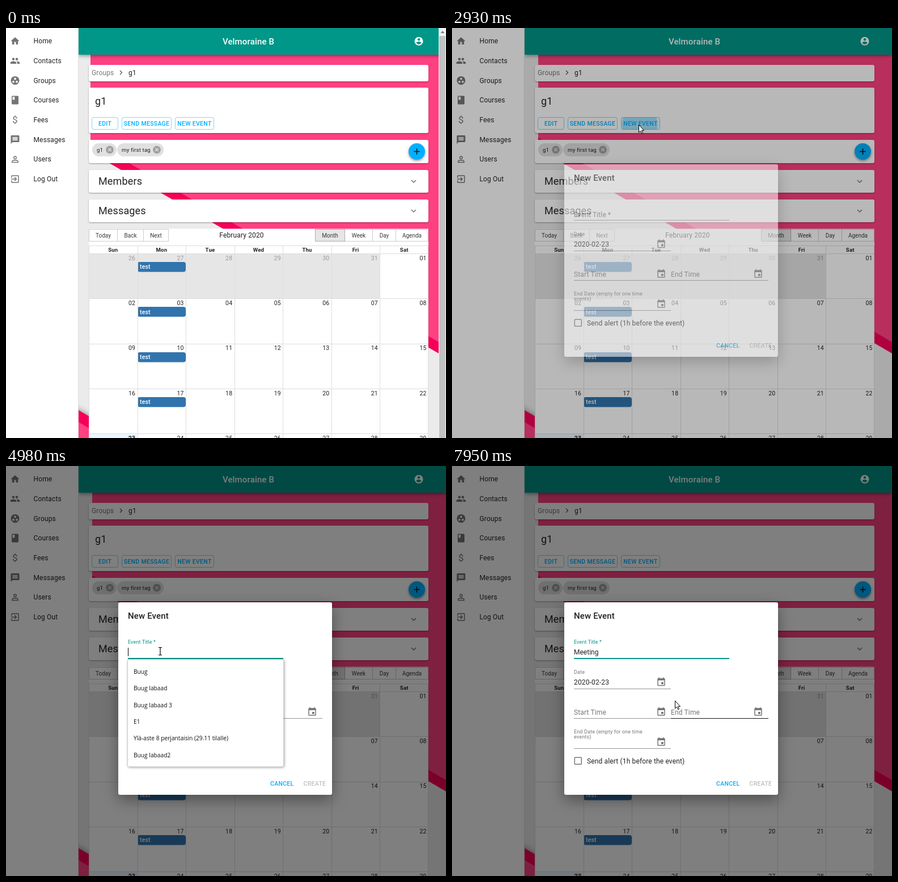
An HTML page that plays this animation: 776 px wide and 722 px high, repeating every 8 s.

```html
<!DOCTYPE html>
<html lang="en">
<head>
<meta charset="utf-8">
<title>New event</title>
<style>
  html, body { margin: 0; width: 100%; height: 100%; overflow: hidden; }
  svg { display: block; font-family: Roboto, sans-serif; letter-spacing: .009em; }
  text { white-space: pre; }
  .card { fill: #fff; filter: drop-shadow(0 1px 1px rgba(0,0,0,.36)); }
  .btn { font-weight: 500; letter-spacing: .028em; }
  .list text { font-family: "Open Sans", sans-serif; letter-spacing: 0; }
</style>
</head>
<body>
<svg id="stage" width="776" height="722" viewBox="0 0 776 722"></svg>
<script>
const LOOP = 8000, TEAL = '#009688', BLUE = '#00b0ff', PINK = '#ff4081', ROSE = '#f50057';
const INK = 'rgba(0,0,0,.87)', SOFT = 'rgba(0,0,0,.54)', LINE = 'rgba(0,0,0,.42)';

// ---------- markup helpers ----------
const text = (x, y, s, size = 12, fill = INK, more = '') =>
  `<text x="${x}" y="${y}" font-size="${size}" fill="${fill}" ${more}>${s}</text>`;
const rect = (x, y, w, h, fill, more = '') =>
  `<rect x="${x}" y="${y}" width="${w}" height="${h}" fill="${fill}" ${more}/>`;
const icon = (cx, cy, body, fill = SOFT) =>
  `<g transform="translate(${cx - 9} ${cy - 9}) scale(.75)" fill="${fill}" fill-rule="evenodd">${body}</g>`;
const path = (d, more = '') => `<path d="${d}" ${more}/>`;
const circle = (x, y, r, more = '') => `<circle cx="${x}" cy="${y}" r="${r}" ${more}/>`;
const card = (y, h) => rect(146, y, 599, h, '#fff', 'rx="3" class="card"');
const mid = 'text-anchor="middle"';

const stroked = 'fill="none" stroke="#757575" stroke-width="1.9"';
const icons = {
  Home: path('M10 20v-6h4v6h5v-8h3L12 3 2 12h3v8z'),
  Contacts: circle(8, 8, 3) + circle(16, 8, 3) +
    path('M8 13c-2.3 0-7 1.2-7 3.5V19h14v-2.500c0-2.300-4.700-3.500-7-3.500zm8 0l-1 .1c1.200.8 2 1.900 2 3.400V19h6v-2.500c0-2.300-4.700-3.500-7-3.500z'),
  Groups: circle(12, 12, 10) + [[8, 15], [12, 8], [16, 15]].map(p => circle(...p, 2.5, 'fill="#fff"')).join(''),
  Courses: path('M18 2H6c-1.100 0-2 .9-2 2v16c0 1.100.9 2 2 2h12c1.100 0 2-.9 2-2V4c0-1.100-.9-2-2-2zM6 4h5v8l-2.500-1.500L6 12z'),
  Fees: text(12, 19.5, '$', 23, '#757575', mid),
  Messages: path('M20 2H4c-1.100 0-2 .9-2 2v18l4-4h14c1.100 0 2-.9 2-2V4c0-1.100-.9-2-2-2zm-2 12H6v-2h12zm0-3H6V9h12zm0-3H6V6h12z'),
  Users: circle(12, 8, 3, stroked) + path('M5 19v-2c0-2 4-3 7-3s7 1 7 3v2z', stroked),
  'Log Out': path('M10.100 15.600L11.500 17l5-5-5-5-1.400 1.400L12.700 11H3v2h9.700zM19 3H5c-1.100 0-2 .9-2 2v4h2V5h14v14H5v-4H3v4c0 1.100.9 2 2 2h14c1.100 0 2-.9 2-2V5c0-1.100-.9-2-2-2z')
};
const eventIcon = path('M17 12h-5v5h5zM16 1v2H8V1H6v2H5c-1.100 0-2 .9-2 2v14c0 1.100.9 2 2 2h14c1.100 0 2-.9 2-2V5c0-1.100-.9-2-2-2h-1V1zm3 18H5V8h14z');
const chevron = path('M16.600 8.600L12 13.200 7.400 8.600 6 10l6 6 6-6z');

// ---------- page ----------
function backdropArt() {
  return rect(0, 0, 776, 722, '#ebebeb') +
    `<polygon id="rose" fill="${ROSE}"/><polygon id="pink" fill="${PINK}"/>` +
    path('M100 657L160 691.500V740H100z', `fill="${ROSE}" style="filter:drop-shadow(0 0 6px rgba(0,0,0,.45))"`) +
    path('M128 694l32 18.500V722H128z', `fill="${PINK}"`);
}

function sidebar() {
  return rect(0, 0, 128, 722, '#fff') + rect(127, 0, 1, 722, 'rgba(0,0,0,.12)') +
    Object.entries(icons).map(([name, body], i) => {
      const y = 23 + i * 34.7;
      return icon(16, y, body) + text(48.5, y + 4.2, name);
    }).join('');
}

function header() {
  return rect(128, 0, 648, 47, TEAL, 'style="filter:drop-shadow(0 2px 3px rgba(0,0,0,.4))"') +
    text(427.5, 28.5, 'Velmoraine B', 15, '#fff', mid + ' font-weight="500"') +
    icon(728, 23.3, circle(12, 12, 10) + circle(12, 8, 3, `fill="${TEAL}"`) +
      path('M12 19.200c-2.500 0-4.700-1.300-6-3.200 0-2 4-3.100 6-3.100s6 1.100 6 3.100c-1.300 1.900-3.500 3.200-6 3.200z', `fill="${TEAL}"`), '#fff');
}

const outlined = (x, w, s) =>
  rect(x + .5, 157.5, w - 1, 21, 'none', `rx="3" stroke="${BLUE}" stroke-opacity=".5"`) +
  text(x + w / 2, 171.6, s, 10.5, BLUE, `${mid} class="btn"`);

const chip = (x, w, s) => {
  const cx = x + w - 12;
  return rect(x, 203, w, 23, '#e0e0e0', 'rx="11.5"') + text(x + 8, 218, s, 9.75) +
    circle(cx, 214.4, 6.8, 'fill="#a0a0a0"') +
    path(`M${cx - 2.6} 211.800l5.200 5.200m0-5.200l-5.200 5.200`, 'stroke="#e0e0e0" stroke-width="1.4"');
};

function cards() {
  return card(65, 29) + text(151, 82.7, 'Groups', 12, SOFT) +
    path('M201 75l3.500 3.500-3.500 3.500', 'fill="none" stroke="#555" stroke-width="1.3"') + text(216, 82.7, 'g1') +
    card(105, 80) + text(157, 135, 'g1', 18) +
    outlined(151, 47, 'EDIT') + outlined(204, 88, 'SEND MESSAGE') +
    rect(298, 157, 69, 22, BLUE, 'id="hover" rx="3"') +
    `<clipPath id="btnClip">${rect(298, 157, 69, 22, '#000', 'rx="3"')}</clipPath>` +
    `<g clip-path="url(#btnClip)">${circle(331, 170, 0, `id="ripple" fill="${BLUE}"`)}</g>` +
    outlined(298, 69, 'NEW EVENT') +
    card(197, 41) + chip(152, 43, 'g1') + chip(196, 82, 'my first tag') +
    circle(724.5, 217.5, 14.5, `fill="${BLUE}" style="filter:drop-shadow(0 2px 2px rgba(0,0,0,.4))"`) +
    path('M719.200 217.500h10.600M724.500 212.200v10.600', 'stroke="#111" stroke-width="1.5"') +
    ['Members', 'Messages'].map((s, i) => card(250 + i * 52, 40) +
      text(163, 276 + i * 52, s, 18) + icon(719, 270 + i * 52, chevron)).join('');
}

function calendar() {
  const colX = c => 146 + c * 599 / 7, rowY = r => 397 + r * 79.3;
  const line = (x, y, w, h) => rect(Math.round(x), Math.round(y), w, h, '#ddd');
  const tool = (x, w, s, on) =>
    rect(x + .5, 354.5, w, 21, on ? '#e6e6e6' : '#fff', `stroke="${on ? '#adadad' : '#ccc'}"`) +
    text(x + w / 2 + .5, 368.6, s, 10, '#373a3c', `${mid} letter-spacing="0"`);
  let out = rect(146, 353.5, 599, 369, '#fff') +
    tool(146, 50, 'Today') + tool(196, 46, 'Back') + tool(242, 44, 'Next') +
    text(415.5, 369.3, 'February 2020', 12, INK, mid) +
    tool(597, 49, 'Week') + tool(646, 41, 'Day') + tool(687, 57, 'Agenda') + tool(545, 52, 'Month', true) +
    rect(146, 397, colX(6) - 146, 79, '#e6e6e6') + rect(146, 714, 85, 8, '#eaf6ff') + line(146, 383, 599, 1);
  for (let r = 0; r < 5; r++) {
    out += line(146, rowY(r), 599, 1);
    for (let c = 0; c < 7; c++) {
      const n = r * 7 + c - 5, off = n < 1, today = n === 23;
      out += text(colX(c + 1) - 3.5, rowY(r) + 11.7, off ? n + 31 : String(n).padStart(2, 0), 10.5,
        off ? '#999' : '#222', `text-anchor="end" font-weight="${today ? 700 : 400}"`);
    }
    if (r < 4) out += rect(232, Math.round(rowY(r) + 15), 85, 17.5, '#3174ad', 'rx="4"') +
      text(236, rowY(r) + 27.2, 'test', 10.5, '#fff', 'font-weight="500"');
  }
  'Sun Mon Tue Wed Thu Fri Sat'.split(' ').forEach((d, c) =>
    out += text(colX(c + .5), 394, d, 9.6, '#222', mid + ' font-weight="700"'));
  for (let c = 0; c < 8; c++) out += line(Math.min(colX(c), 744), 383, 1, 339);
  return out;
}

const scrollbar = () => `<g id="bar">${rect(763, 0, 13, 722, '#f1f1f1')}${rect(764, 14, 11, 708, '#c1c1c1')}
  ${path('M766.500 9l3.500-4 3.500 4z', 'fill="#777"')}</g>`;

// ---------- dialog ----------
const under = (x, y, w, id = '', h = 1, fill = LINE) => rect(x, y, w, h, fill, id && `id="${id}" opacity="0"`);

function dialog() {
  const list = ['Buug', 'Buug labaad', 'Buug labaad 3', 'E1', 'Ylä-aste 8 perjantaisin (29.11 tilalle)', 'Buug labaad2'];
  return rect(198, 240, 377, 339, '#fff', 'rx="3" style="filter:drop-shadow(0 9px 13px rgba(0,0,0,.38))"') +
    text(215, 269, 'New Event', 15, INK, 'font-weight="500"') +
    text(0, 0, 'Event Title *', 12, SOFT, 'id="label"') +
    under(215, 338, 274) + under(215, 338, 274, 'titleHover', 2, INK) + rect(215, 338, 274, 2, TEAL, 'id="focus"') +
    text(215, 332, '', 12, INK, 'id="input" letter-spacing="0"') + rect(215, 320, 1, 15, '#000', 'id="caret"') +
    text(215, 366, 'Date', 9, SOFT) + text(215, 385, '2020-02-23') + icon(369, 380.5, eventIcon) +
    under(215, 392, 171) + under(215, 392, 171, 'dateHover', 1, INK) +
    text(215, 437.8, 'Start Time', 12, SOFT) + icon(369, 433, eventIcon) + under(215, 444, 171) +
    text(386, 437.8, 'End Time', 12, SOFT) + icon(540, 433, eventIcon) +
    under(386, 444, 172) + under(386, 444, 172, 'endHover', 1, INK) +
    text(215, 471, 'End Date (empty for one time', 9, SOFT) + text(215, 480, 'events)', 9, SOFT) +
    icon(369, 486, eventIcon) + under(215, 497, 171) +
    rect(216.3, 513.3, 12, 12, 'none', 'rx="1" stroke="#757575" stroke-width="1.5"') +
    text(238, 523.5, 'Send alert (1h before the event)') +
    text(466, 563.3, 'CANCEL', 10.5, BLUE, 'class="btn"') +
    text(524.5, 563.3, 'CREATE', 10.5, 'rgba(0,0,0,.26)', 'class="btn"') +
    `<g id="list" class="list">${rect(214.5, 340.5, 275, 189, '#fff', 'rx="2" stroke="#ccc" style="filter:drop-shadow(1px 1px 2px rgba(0,0,0,.35))"')}
    ${list.map((s, i) => text(225, 366 + i * 29.35, s, 10.2, '#111')).join('')}</g>`;
}

const cursor = () => `<g id="cursor">` +
  path('M.5 .5v13.500l3-2.800 2 4.600 2-.9-2-4.500h4z', 'id="arrow" fill="#fff" stroke="#000" stroke-width="1" stroke-linejoin="round"') +
  path('M-3-6.500h2.200l.8.8.8-.8H3M0-6V6.500M-3 7h2.200l.8-.8.8.8H3', 'id="beam" fill="none" stroke="#000" stroke-width="1.2"') + '</g>';

const stage = document.getElementById('stage');
stage.innerHTML = backdropArt() + cards() + calendar() + header() + sidebar() + scrollbar() +
  rect(0, 0, 776, 722, '#000', 'id="shade"') + `<g id="dialog">${dialog()}</g>` + cursor();

const el = {};
stage.querySelectorAll('[id]').forEach(n => el[n.id] = n);
const set = (id, attrs) => { for (const k in attrs) el[id].setAttribute(k, attrs[k]); };
const show = (id, on) => set(id, { visibility: on ? 'visible' : 'hidden' });

// ---------- motion ----------
const ramp = (t, from, len) => Math.min(1, Math.max(0, (t - from) / len));
// cubic-bezier(x1, 0, .2, 1)
const bezier = x1 => p => {
  let lo = 0, hi = 1, s = p;
  for (let i = 0; i < 20; i++) {
    s = (lo + hi) / 2;
    const x = 3 * (1 - s) * s * ((1 - s) * x1 + s * .2) + s ** 3;
    x < p ? lo = s : hi = s;
  }
  return p <= 0 ? 0 : p >= 1 ? 1 : 3 * (1 - s) * s * s + s ** 3;
};
const easeInOut = bezier(.4), easeOut = bezier(0);

const track = [[370, 457, 574], [470, 457, 574], [700, 435, 455], [960, 378, 262], [1050, 369, 247], [1120, 368, 267],
  [1380, 368, 267], [1670, 333, 238], [2000, 329, 190], [2220, 329, 173], [2370, 329, 170], [3060, 329, 170],
  [3400, 290, 294], [3560, 274, 321], [3650, 272, 326], [7300, 272, 326], [7950, 393, 413], [8000, 393, 413]];
const typed = [[5125, 'M'], [5275, 'Me'], [5445, 'Mee'], [5985, 'Meeti'], [6065, 'Meetin'], [6145, 'Meeting']];

function pointer(t) {
  const i = Math.max(1, track.findIndex(k => k[0] > t));
  const [a, b] = [track[i - 1], track[i]], p = ramp(t, a[0], b[0] - a[0]);
  return [1, 2].map(k => a[k] + (b[k] - a[k]) * p);
}

function draw(t) {
  const open = t >= 2800, fade = easeInOut(ramp(t, 2808, 330));
  const [left, right] = open ? [152, 776] : [149, 763];
  const top = 553 - (right - left) * .577;
  const shape = d => `${left},40 ${right},40 ${right},${553 + d} ${left},${top + d}`;
  set('pink', { points: shape(0) });
  set('rose', { points: shape(20) });
  show('bar', !open);

  set('hover', { opacity: .08 * ramp(t, 2200, 180) * (1 - ramp(t, 3090, 150)) });
  set('ripple', { r: 38 * easeInOut(ramp(t, 2630, 550)), opacity: .3 * (1 - ramp(t, 3030, 330)) });
  set('shade', { opacity: fade / 2 });
  set('dialog', { opacity: fade });

  const focus = easeOut(ramp(t, 3885, 200));
  set('label', {
    transform: `translate(215 ${332.5 - 19.5 * focus}) scale(${1 - focus / 4})`,
    fill: focus ? TEAL : SOFT
  });
  set('focus', { transform: `translate(${352 * (1 - focus)} 0) scale(${focus} 1)` });
  set('titleHover', { opacity: ramp(t, 3470, 180) });
  show('list', t >= 3955 && t < 5200);

  const key = typed.filter(k => k[0] <= t).pop() || [3895, ''];
  el.input.textContent = key[1];
  set('caret', { x: Math.floor(215 + el.input.getComputedTextLength()) });
  show('caret', t >= 3895 && (t - key[0]) % 1085 < 542);

  const [x, y] = pointer(t), beam = t > 3400 && y > 316 && y < 341;
  set('cursor', { transform: `translate(${Math.round(x)} ${Math.round(y)})` });
  show('cursor', t >= 368);
  show('arrow', t >= 368 && !beam);
  show('beam', beam);
  const leaving = t > 7300;
  set('dateHover', { opacity: leaving && y > 366 && y < 394 ? .8 : 0 });
  set('endHover', { opacity: leaving ? ramp(t, 7850, 100) : 0 });
}

function loop() {
  draw(performance.now() % LOOP);
  requestAnimationFrame(loop);
}
loop();
</script>
</body>
</html>
```
